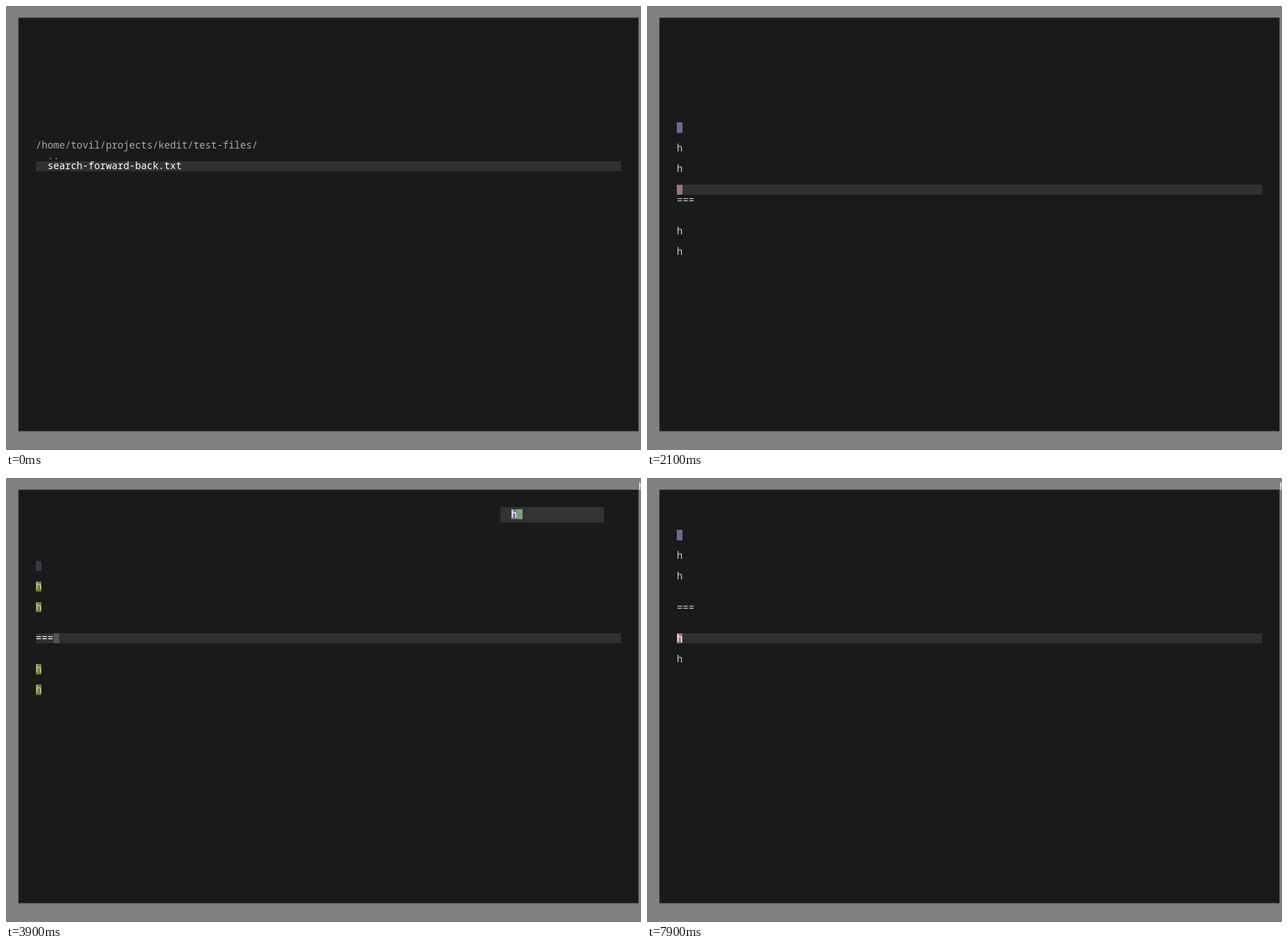
An HTML page with a canvas that plays this animation: 895x626 px, repeating every 8000 ms.

```html
<!DOCTYPE html>
<html lang="en">
<head>
<meta charset="utf-8">
<style>
  html, body { margin: 0; width: 100%; height: 100%; overflow: hidden; background: #808080; }
  canvas { display: block; }
</style>
</head>
<body>
<canvas id="stage" width="895" height="626"></canvas>
<script>
const ctx = document.getElementById('stage').getContext('2d');
const LOOP = 8000, STEP = 100;
const LEFT = 42, CENTER = 218.5, ROW = 14.57, COL = 8.232, BASE = 11.8;
const SELECT = 'rgba(171,171,249,0.55)', RED = '#9b7676', GREEN = '#76a378';
const TEXT = '#cccccc';

const doc = ['', '', 'h', '', 'h', '', '', '===', '', '', 'h', '', 'h'];
const files = ['/home/tovil/projects/kedit/test-files/', '  ..', '  search-forward-back.txt'];

// Cursor moves; the view glides until the cursor row is centred.
const moves = [
  { at: 600, row: 0, col: 0, from: 2 },
  { at: 1400, row: 1, col: 0, from: 0 },
  { at: 2100, row: 6, col: 0, from: 1 },
  { at: 2800, row: 7, col: 3, from: 6 },
  { at: 7600, row: 10, col: 0, from: 7 }
];

function rect(x, y, w, h, color) {
  const left = Math.round(x), top = Math.round(y);
  ctx.fillStyle = color;
  ctx.fillRect(left, top, Math.round(x + w) - left, Math.round(y + h) - top);
}

const cell = (x, y, color) => rect(x, y, COL, ROW, color);

function write(text, x, y, color) {
  ctx.fillStyle = color;
  ctx.fillText(text, x, Math.round(y + BASE));
}

function drawLines(lines, current, scroll, color) {
  lines.forEach((line, i) =>
    write(line, LEFT, CENTER + (i - scroll) * ROW, i === current ? '#ffffff' : color));
}

function drawRowHighlight(y) {
  rect(LEFT, y, 825, ROW, '#303030');
}

function drawEditor(t) {
  const move = moves.findLast(m => t >= m.at);
  const rest = 0.25 ** ((t - move.at + 57) / 100);
  const scroll = move.row + (move.from - move.row) * rest;
  const rowY = row => CENTER + (row - scroll) * ROW;
  const searching = t >= 3400 && t < 7600;
  const typed = t >= 3900;
  const inserting = t < 5900;

  drawRowHighlight(rowY(move.row));
  if (searching && typed) {
    doc.forEach((line, i) => line === 'h' && cell(LEFT, rowY(i), '#7b7b27'));
  }
  const dimCursor = inserting ? '#485c49' : '#614b4b';
  cell(LEFT + move.col * COL, rowY(move.row), searching ? dimCursor : RED);
  cell(LEFT, rowY(0), searching ? '#3a3846' : SELECT);
  drawLines(doc, move.row, scroll, TEXT);

  if (searching) {
    const x = 712, y = 43.7;
    rect(697, 41, 146, 22, '#333333');
    cell(x + (typed ? COL : 0), y, inserting ? GREEN : RED);
    cell(x, y, SELECT);
    if (typed) write('h', x, y, '#ffffff');
  }
  if (typed) write('h', 891.5, 5, '#ffffff');
}

function draw(t) {
  rect(0, 0, 895, 626, '#808080');
  ctx.fillStyle = '#1a1a1a';
  ctx.fillRect(17.5, 16.5, 874, 583);
  ctx.font = '13.72px "Noto Sans Mono", monospace';
  if (t < 600) {
    drawRowHighlight(CENTER);
    drawLines(files, 2, 2, '#aaaaaa');
  } else {
    drawEditor(t);
  }
}

function tick() {
  const t = performance.now() % LOOP;
  draw(Math.floor(t / STEP) * STEP);
  requestAnimationFrame(tick);
}
tick();
</script>
</body>
</html>
```
